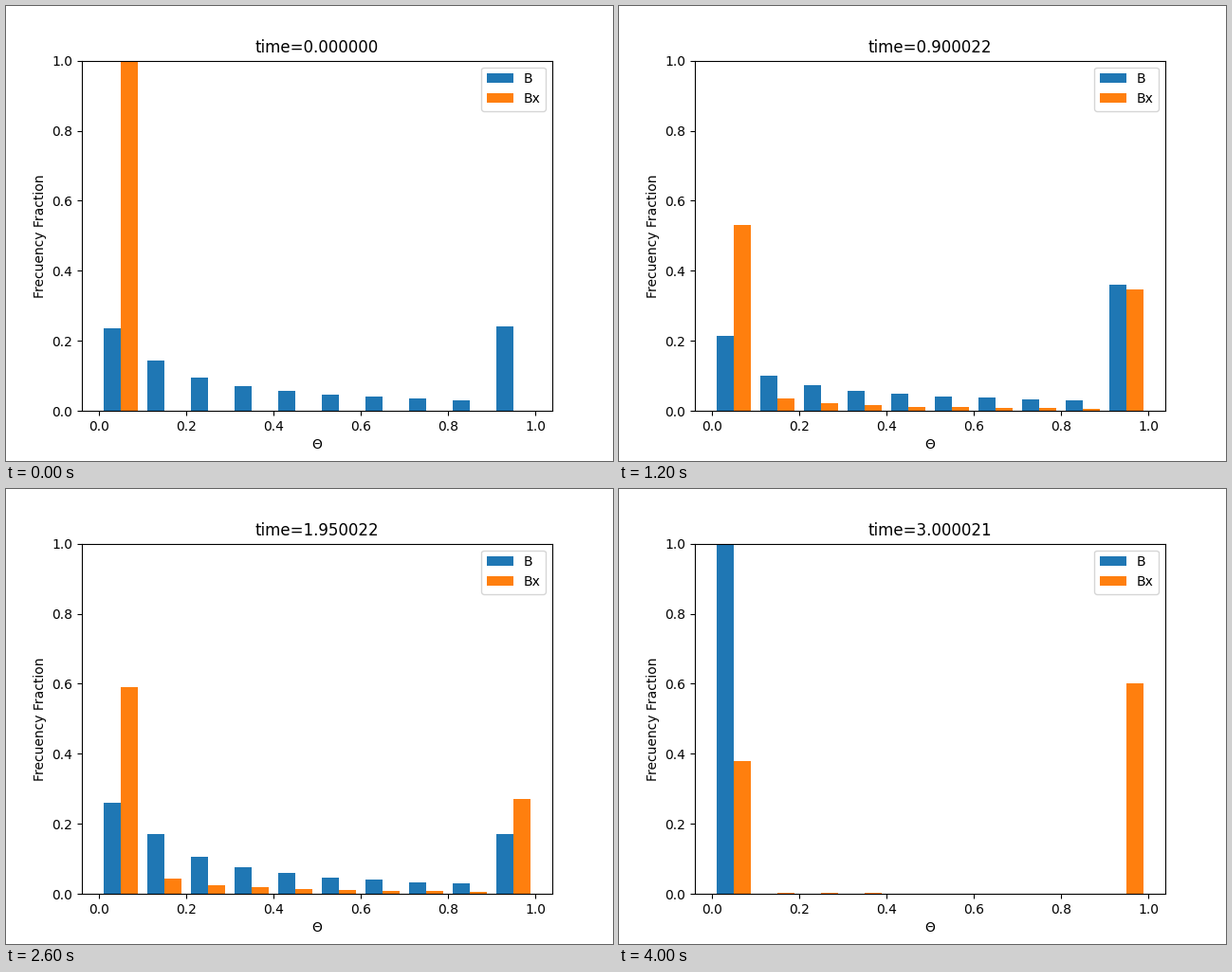
Recreate the animation shown at these times as a matplotlib script. Size 640 px wide and 480 px high, loop 4.2 s.

```python
import matplotlib.pyplot as plt
import numpy as np
from matplotlib.animation import FuncAnimation

FRAMES, INTERVAL = 21, 200
WIDTH = 0.04
CENTERS = np.arange(10) / 10 + 0.05
TOTAL = 0.996  # a sliver of each population falls outside the bins

# step, time, then the first and last bin of B and of Bx
KEYS = np.array([
    (0, 0.000000, 0.236, 0.241, 1.000, 0.000),
    (2, 0.300006, 0.226, 0.285, 0.740, 0.190),
    (4, 0.600012, 0.217, 0.325, 0.606, 0.292),
    (8, 1.200031, 0.209, 0.395, 0.453, 0.401),
    (10, 1.500022, 0.206, 0.420, 0.410, 0.430),
    (11, 1.650018, 0.255, 0.192, 0.464, 0.439),
    (13, 1.950022, 0.260, 0.171, 0.590, 0.271),
    (17, 2.550000, 0.243, 0.211, 0.517, 0.341),
    (19, 2.850014, 0.236, 0.230, 0.485, 0.370),
    (20, 3.000021, 1.000, 0.000, 0.380, 0.601),
])


def distribution(first, last, flattening):
    """Spread what the end bins leave over the middle as a power-law tail."""
    steepness = 1.5 - flattening * last
    tail = np.arange(2, 10) ** -steepness
    tail *= max(TOTAL - first - last, 0) / tail.sum()
    return [first, *tail, last]


fig, ax = plt.subplots(figsize=(6.4, 4.8), dpi=100)
bars_b = ax.bar(CENTERS - WIDTH / 2, 1, WIDTH, color="C0", label="B")
bars_bx = ax.bar(CENTERS + WIDTH / 2, 1, WIDTH, color="C1", label="Bx")
ax.set_ylim(0, 1)
ax.set_xlabel("Θ")
ax.set_ylabel("Frecuency Fraction")
ax.legend(loc="upper right")
title = ax.set_title("")


def update(frame):
    time, *ends = (np.interp(frame, KEYS[:, 0], column)
                   for column in KEYS[:, 1:].T)
    heights = distribution(*ends[:2], 2) + distribution(*ends[2:], 1)
    for bar, height in zip([*bars_b, *bars_bx], heights):
        bar.set_height(height)
    title.set_text(f"time={time:.6f}")
    return [*bars_b, *bars_bx, title]


anim = FuncAnimation(fig, update, frames=FRAMES, interval=INTERVAL,
                     repeat=True, repeat_delay=0)
plt.show()
```
